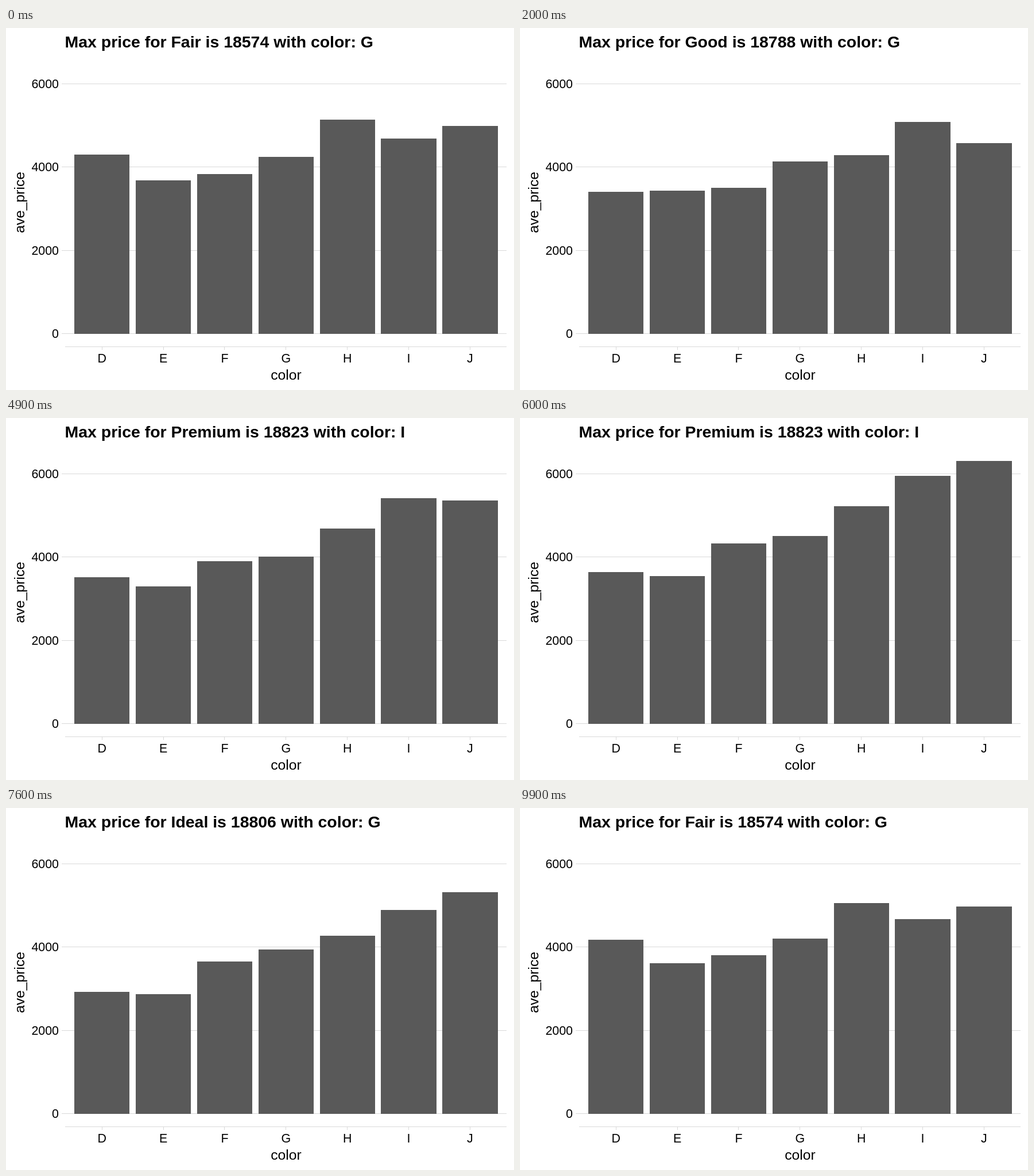
Animation, 885 px wide and 632 px high, one loop 10 s. Source, as an HTML page:

```html
<!DOCTYPE html>
<html lang="en">
<head>
<meta charset="utf-8">
<title>Average price by color</title>
<style>
  html, body { margin: 0; width: 100%; height: 100%; overflow: hidden; background: #fff; }
  svg { display: block; }
  text { font-family: "Liberation Sans", Arial, sans-serif; font-size: 21.4px; fill: #000; }
  .name { font-size: 24.7px; text-anchor: middle; }
  #title { font-size: 28.45px; font-weight: bold; }
  .line { fill: #d9d9d9; }
  .bar { fill: #595959; }
  rect { shape-rendering: crispEdges; }
</style>
</head>
<body>
<svg id="chart" width="885" height="632" viewBox="0 0 885 632">
  <text id="title" x="102.6" y="34"></text>
  <text class="name" x="488" y="614">color</text>
  <text class="name" transform="translate(32 304.5) rotate(-90)">ave_price</text>
</svg>
<script>
const COLORS = 'DEFGHIJ';
const CUTS = [
  { name: 'Fair', max: 18574, top: 'G', avg: [4291.06, 3682.31, 3827, 4239.25, 5135.68, 4685.45, 4975.66] },
  { name: 'Good', max: 18788, top: 'G', avg: [3405.38, 3423.64, 3495.75, 4123.48, 4276.25, 5078.53, 4574.17] },
  { name: 'Very Good', max: 18818, top: 'G', avg: [3470.47, 3214.65, 3778.82, 3872.75, 4535.39, 5255.88, 5103.51] },
  { name: 'Premium', max: 18823, top: 'I', avg: [3631.29, 3538.91, 4324.89, 4500.74, 5216.71, 5946.18, 6294.59] },
  { name: 'Ideal', max: 18806, top: 'G', avg: [2629.09, 2597.55, 3374.94, 3720.71, 3889.33, 4451.97, 4918.19] }
];
const STEP = 100, STEPS_PER_CUT = 20, BOTTOM = 534;

const chart = document.getElementById('chart');
const title = document.getElementById('title');
const yOf = price => Math.round(533.4 - price * 0.07275);

function add(tag, attrs, text = '') {
  const el = document.createElementNS('http://www.w3.org/2000/svg', tag);
  for (const key in attrs) el.setAttribute(key, attrs[key]);
  el.textContent = text;
  return chart.appendChild(el);
}
const box = (cls, x, y, width, height) => add('rect', { class: cls, x, y, width, height });

for (let price = 0; price <= 6000; price += 2000) {
  const y = yOf(price);
  box('line', 97, y, 775, 1);
  add('text', { x: 92, y: y + 8, 'text-anchor': 'end' }, price);
}
box('line', 103, 556, 769, 1);

const bars = [...COLORS].map((color, i) => {
  const left = 119.1 + 106.87 * i;
  const x = Math.round(left), mid = left + 48.1;
  box('line', Math.floor(mid), 557, 1, 5);
  add('text', { x: mid, y: 584, 'text-anchor': 'middle' }, color);
  return box('bar', x, 0, Math.round(left + 96.2) - x, 0);
});

function draw(time) {
  const step = Math.floor(time / STEP) % (STEPS_PER_CUT * CUTS.length);
  const index = Math.floor(step / STEPS_PER_CUT);
  const from = CUTS[index], to = CUTS[(index + 1) % CUTS.length];
  // the first cut rests one step less than the others
  const rest = index ? 6 : 5;
  const mix = Math.max(0, (step % STEPS_PER_CUT - rest) / (STEPS_PER_CUT - rest));
  const cut = mix ? to : from;

  title.textContent = `Max price for ${cut.name} is ${cut.max} with color: ${cut.top}`;
  bars.forEach((bar, i) => {
    const y = yOf(from.avg[i] + (to.avg[i] - from.avg[i]) * mix);
    bar.setAttribute('y', y);
    bar.setAttribute('height', BOTTOM - y);
  });
}

const start = performance.now();
function tick() {
  draw(performance.now() - start);
  requestAnimationFrame(tick);
}
tick();
</script>
</body>
</html>
```
